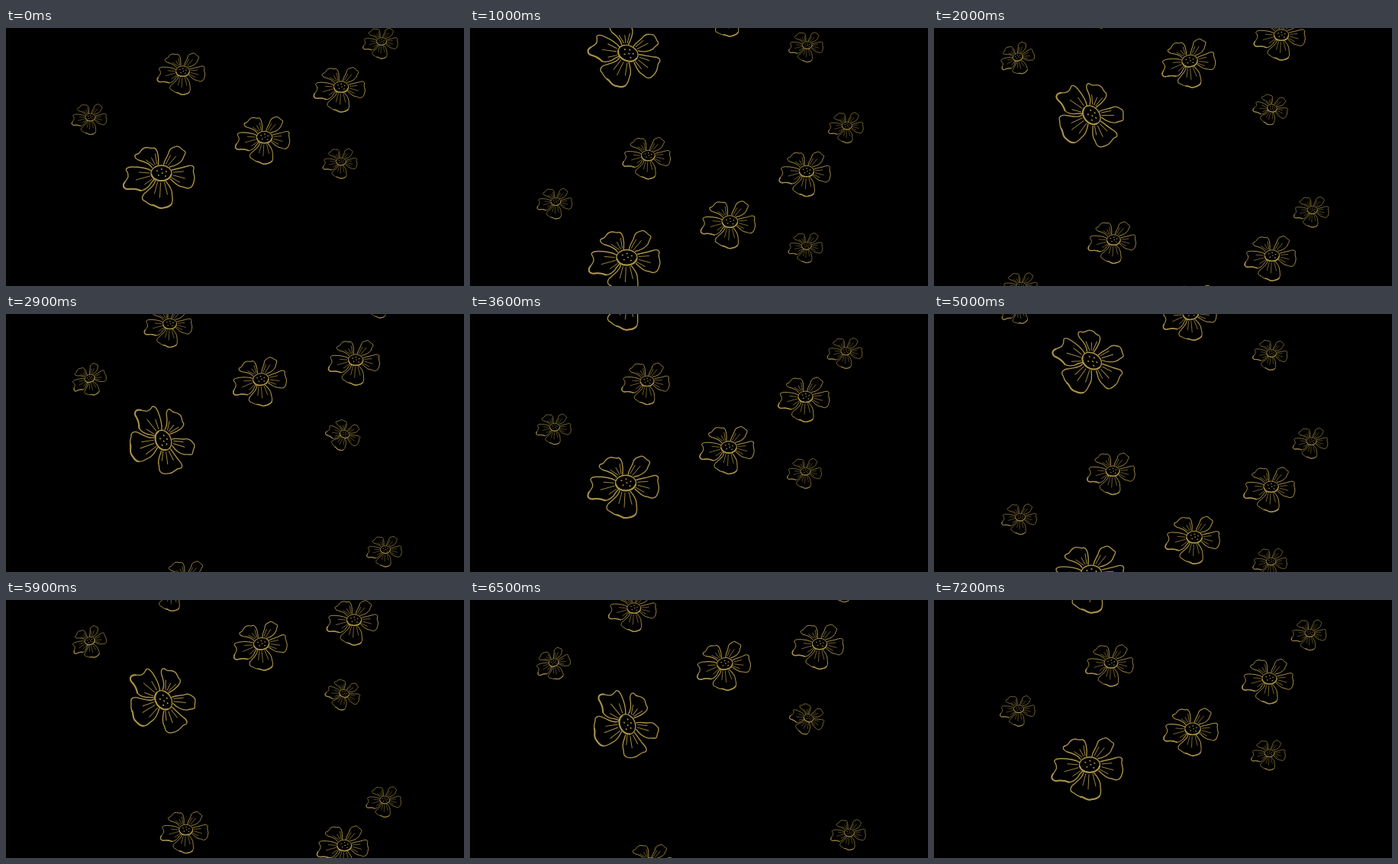
An HTML page for the animation above (7.3 s loop, 600x338 px).

```html
<!DOCTYPE html>
<html lang="en">
<head>
<meta charset="utf-8">
<title>Falling flowers</title>
<style>
  html, body { margin: 0; width: 100%; height: 100%; overflow: hidden; background: #000; }
  svg { display: block; width: 100vw; height: 100vh; }
</style>
</head>
<body>
<svg id="stage" viewBox="0 0 600 338" preserveAspectRatio="none">
  <defs>
    <g id="flower" fill="none" stroke="#ab9348" stroke-linecap="round" stroke-linejoin="round">
      <g stroke-width="1.35">
        <path d="M-12-7C-15-12-22-15-30-17C-36-20-36-24-31-25C-27-26-28-31-22-33C-17-35-14-31-10-33C-5-32-3-22-4-11"/>
        <path d="M3-11C4-18 9-22 10-28C12-34 16-33 20-35C24-36 26-31 30-29C34-27 29-23 28-18C25-13 18-9 11-8"/>
        <path d="M14-4C21-6 28-7 34-9C40-11 44-9 42-4C41 0 45 4 43 10C42 14 41 18 38 19C34 22 31 18 27 18C20 17 16 11 12 8"/>
        <path d="M-8 10C-9 17-15 20-20 25C-26 29-26 34-23 36C-18 38-18 41-12 42C-7 42-6 46 0 46C6 45 10 45 13 41C16 37 14 32 14 27C14 20 9 15 6 11"/>
        <path d="M-13-3C-20-7-30-8-38-8C-45-8-48-5-45-2C-42 3-43 6-48 12C-52 18-48 22-42 21C-36 20-32 21-27 23C-22 23-19 20-16 17C-14 13-11 10-9 8"/>
        <ellipse rx="13.5" ry="10"/>
      </g>
      <path stroke-width="2" d="M-13 2C-10 13 10 13 13 2M-48 12C-52 18-48 22-42 21C-36 20-32 21-27 23M-12 42C-7 42-6 46 0 46C6 45 10 45 13 41"/>
      <path stroke-width=".9" d="M-8-11L-13-20M-6-12L-8-25M-10-10L-20-17M6-12L12-23M9-10L19-22M16-1L29-2M16 3L31 7M13 6L24 12M-5 12L-9 27M-1 13L-2 32M4 12L8 28M-16 0L-29-1M-15 4L-33 9M-12 8L-22 15"/>
      <path stroke-width="1.6" d="M-6-3h.8M0-5h.8M6-2h.8M-4 3h.8M1 0h.8M5 4h.8"/>
    </g>
  </defs>
  <rect width="600" height="338"/>
</svg>
<script>
const CYCLE = 3.65, CLIP = 3.317, SLOW_FROM = 2.14, SLOW_RATE = 0.65;
const LOOP = 7300, STEP = 100;

// x, y, scale at clip start; vx, vy per second; angle and spin in degrees
const flowers = [];
const add = (x, y, size, vx = 1.9, vy = 110.5, angle = 0, spin = 0) =>
  flowers.push({ x, y, size, vx, vy, angle, spin });

// Leaving group
add(203.5, 190, 1);
add(110.5, 117, .49);
add(231.5, 56.5, .67);
add(439, 77, .72);
add(492, 17.5, .49);
add(338.5, 143, .765);
add(439, 175, .48);

// Entering group
add(207.5, -48, 1, -.5, 81, -4, 27);
add(110.5, -108, .49, -.3, 73, -18);
add(233, -169, .67, -7, 69);
add(445, -152, .72, 5, 80.5);
add(490, -215, .49, 0, 75);
add(339, -91, .765, -2, 67, -8);
add(440.5, -60, .48, 1.2, 82.5, -12, 13);

const stage = document.getElementById('stage');
for (const f of flowers) {
  f.node = document.createElementNS(stage.namespaceURI, 'use');
  f.node.setAttribute('href', '#flower');
  stage.append(f.node);
}

function clipTime(ms) {
  const t = (ms / 1000) % CYCLE % CLIP;
  return t < SLOW_FROM ? t : SLOW_FROM + (t - SLOW_FROM) * SLOW_RATE;
}

function draw(ms) {
  const s = clipTime(ms);
  for (const f of flowers) {
    const x = f.x + f.vx * s, y = f.y + f.vy * s;
    f.node.setAttribute('transform',
      `translate(${x} ${y}) rotate(${f.angle + f.spin * s}) scale(${f.size})`);
  }
}

const start = performance.now();
function tick() {
  const ms = (performance.now() - start) % LOOP;
  draw(Math.floor(ms / STEP) * STEP);
  requestAnimationFrame(tick);
}
tick();
</script>
</body>
</html>
```
